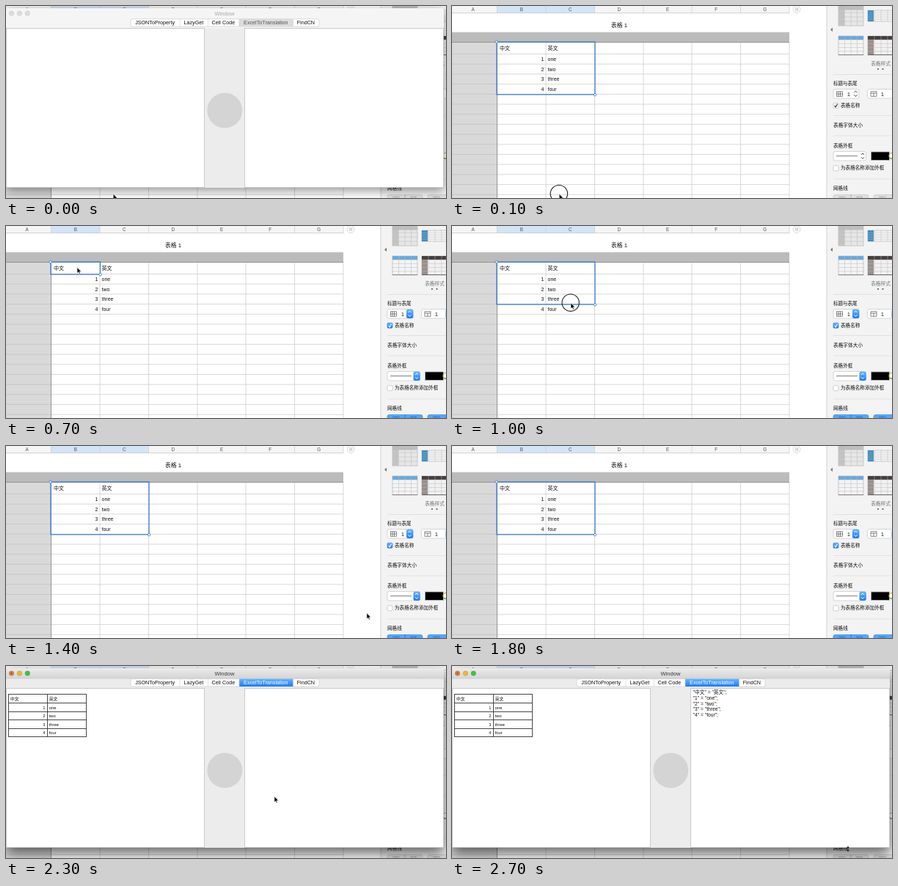
Animation, 600 px wide and 262 px high, one loop 2800 ms. Source, as an HTML page:

```html
<!DOCTYPE html>
<html lang="zh">
<head>
<meta charset="utf-8">
<style>
html, body { margin: 0; width: 100%; height: 100%; overflow: hidden; background: #fff; }
svg { display: block; width: 600px; height: 262px; }
text { font-family: "Liberation Sans", "Noto Sans CJK SC", "Noto Sans CJK", sans-serif; white-space: pre; }
#win { filter: drop-shadow(0 4px 7px rgba(0,0,0,.42)); }
#win.live { filter: drop-shadow(0 8px 9px rgba(0,0,0,.6)); }
</style>
</head>
<body>
<svg id="stage" viewBox="0 0 600 262" xmlns="http://www.w3.org/2000/svg">
  <defs>
    <linearGradient id="blue" x2="0" y2="1"><stop stop-color="#6db5fb"/><stop offset="1" stop-color="#1a7bf8"/></linearGradient>
    <linearGradient id="bar" x2="0" y2="1"><stop stop-color="#ebebeb"/><stop offset="1" stop-color="#d4d4d4"/></linearGradient>
  </defs>
  <g id="sheet"></g>
  <g id="win"></g>
  <g id="pointer"></g>
</svg>
<script>
const LOOP = 2800, STEP = 100;
const $ = id => document.getElementById(id);
const rect = (x, y, w, h, fill, more = '') => `<rect x="${x}" y="${y}" width="${w}" height="${h}" fill="${fill}" ${more}/>`;
const dot = (x, y, r, fill, more = '') => `<circle cx="${x}" cy="${y}" r="${r}" fill="${fill}" ${more}/>`;
const path = (d, stroke, w = 1, fill = 'none') => `<path d="${d}" stroke="${stroke}" stroke-width="${w}" fill="${fill}"/>`;
// y is the middle of the line of text
const text = (s, x, y, size = 7, fill = '#111', anchor = 'start', more = '') =>
  `<text x="${x}" y="${y + size * .36}" font-size="${size}" fill="${fill}" text-anchor="${anchor}" ${more}>${s}</text>`;

const cols = [0, 61.5, 128, 194.5, 261, 327, 393.5, 460];
const rows = Array.from({ length: 16 }, (_, i) => i ? 65.5 + (i - 1) * 13.7 : 49.5);
const words = [['中文', '英文'], ['1', 'one'], ['2', 'two'], ['3', 'three'], ['4', 'four']];

function cells(xLeft, xNum, xWord, y, size) {
  return words.map(([a, b], i) =>
    text(a, i ? xNum : xLeft, y(i), size, '#111', i ? 'end' : 'start') +
    text(b, xWord, y(i), size)).join('');
}

function thumb(x, y, w, h, top, side, body) {
  let s = rect(x, y, w, h, body, 'stroke="#aaa" stroke-width=".6"');
  if (side) s += rect(x, y, 8, h, side);
  if (top) s += rect(x, y, w, 5, top);
  for (let i = 1; i < 5; i++) s += path(`M${x} ${y + i * h / 5}h${w}`, '#b9b9b9', .5);
  for (let i = 1; i < 4; i++) s += path(`M${x + i * w / 4} ${y}v${h}`, '#b9b9b9', .5);
  return s;
}

function arrows(x, y, color) {
  return path(`M${x - 2} ${y - 1.6}l2 -2.2l2 2.2M${x - 2} ${y + 1.6}l2 2.2l2 -2.2`, color, 1);
}

function popup(x, y, w, live) {
  const r = 'rx="2.5"';
  return rect(x, y, w, 12.5, '#fff', r + ' stroke="#c6c6c6" stroke-width=".7"') +
    (live ? rect(x + w - 9, y, 9.3, 12.5, 'url(#blue)', r) : '') +
    arrows(x + w - 4.5, y + 6.2, live ? '#fff' : '#444');
}

function check(y, label, on, live) {
  const fill = on && live ? 'url(#blue)' : '#fff';
  return rect(520, y, 7, 7, fill, `rx="1.2" stroke="${on && live ? '#2f83ee' : '#bbb'}" stroke-width=".7"`) +
    (on ? path(`M521.6 ${y + 3.6}l1.6 2l2.4 -4.4`, live ? '#fff' : '#333', 1.1) : '') +
    text(label, 530, y + 3.3, 6.6);
}

function tableIcon(x, y, d) {
  return rect(x, y, 8, 6.4, '#fff', 'stroke="#555" stroke-width=".7"') + path(d, '#555', .7);
}

function sidebar(live) {
  const head = (s, y, size = 6.6) => text(s, 520, y, size, '#111', 'start', 'font-weight="500"');
  let s = rect(511, 0, 89, 262, '#f3f3f3') + path('M511 0V262', '#cfcfcf', 1);
  s += thumb(527, -3, 34, 30, '', '#c4c4c4', '#e6e6e6') + rect(527, -3, 34, 8.5, '#bcbcbc', 'opacity=".9"');
  s += thumb(567, 6, 36, 15, '', '#3f8cc0', '#f4f4f4');
  s += thumb(527, 41, 34, 26, '#6ba9db', '', '#f4f4f4') + path('M527 66.5h34', '#777', .8);
  s += thumb(567, 41, 36, 26, '#463f40', '#9b8f8b', '#f1f1f1') + path('M567 66.5h36', '#555', .8);
  s += path('M519 29.5l-3 2.7l3 2.7z', 'none', 0, '#777');
  s += text('表格样式', 584.5, 79, 6.7, '#777', 'middle') + dot(581, 86, 1.1, '#555') + dot(587.5, 86, 1.1, '#555');
  for (const y of [93.5, 149.5, 177, 236]) s += path(`M520 ${y}H600`, '#dedede', .8);
  s += head('标题与表尾', 105.5, 6.5);
  s += popup(520, 113.5, 35, live) + popup(566.5, 113.5, 42, live);
  s += tableIcon(524.5, 116.8, 'M527 116.8v6.4M529.5 116.8v6.4M524.5 120h8') + text('1', 539, 120);
  s += tableIcon(571, 116.8, 'M571 119h8M575 119v4.2') + text('1', 585, 120);
  s += check(132.3, '表格名称', true, live);
  s += head('表格字体大小', 163, 6.7);
  s += head('表格外框', 190.3);
  s += popup(520, 198.5, 44.5, live) + path('M524 204.7H553', '#555', .8);
  s += rect(571.5, 199, 25, 11.5, '#000', 'stroke="#bbb" stroke-width=".8"');
  s += dot(600, 204.5, 4, '#fff', 'stroke="#c7a13c" stroke-width="1.2"') + path('M597.4 207a4 4 0 0 0 2.6 1.5', '#4fae4f', 1.3);
  s += check(217.8, '为表格名称添加外框', false, live);
  s += head('网格线', 249);
  const [btn, edge, mark] = live ? ['#58a4f6', '#3d8eea', '#2f6fb8'] : ['#e0e0e0', '#c4c4c4', '#a5a5a5'];
  for (const [x, w] of [[520, 48], [575, 30]])
    s += rect(x, 257.5, w, 12, btn, `rx="2.5" stroke="${edge}" stroke-width=".7"`);
  s += path('M527 260.5h10M532 260v2M551 260.5h9M553.5 260v2M558 260v2M582 260.5h10M586 260v2M544 257.5v5', mark, .8);
  return s;
}

function selection(c, bottom) {
  const x = cols[c], blue = '#3f7fd0';
  const knob = (kx, ky) => dot(kx, ky, 1.7, '#fff', `stroke="${blue}" stroke-width=".9"`);
  return rect(61, 49, x - 60.5, bottom - 49, 'none', `stroke="${blue}" stroke-width="1.3"`) +
    knob(60.6, 49) + knob(x + .6, bottom + .3);
}

function sheet(live, c, bottom) {
  let s = rect(0, 0, 600, 262, '#fff') + rect(0, 0, 460, 9.5, '#f5f5f5');
  s += rect(61.5, 0, cols[c] - 61.5, 9.5, '#d3e4f7');
  s += rect(0, 36, 460, 13.5, '#bbb') + rect(0, 49.5, 61.5, 213, '#d9d9d9');
  s += path('M0 9.5H460M0 36H460', '#c8c8c8', .8);
  cols.slice(1).forEach(x => {
    s += path(`M${x} 0V9.5`, '#d0d0d0', .8) + path(`M${x} 49.5V262`, '#cfcfcf', .8);
  });
  rows.slice(1).forEach(y => {
    s += path(`M0 ${y}H61.5`, '#c2c2c2', .8) + path(`M61.5 ${y}H460`, '#cfcfcf', .8);
  });
  s += path('M0 49.5H460M61.5 49.5V262', '#8d8d8d', .9);
  [...'ABCDEFG'].forEach((l, i) => {
    s += text(l, i ? (cols[i] + cols[i + 1]) / 2 : 28.5, 5, 6.3, '#555', 'middle');
  });
  s += dot(470, 4.5, 5, '#fafafa', 'stroke="#d2d2d2" stroke-width=".8"') + path('M469 2.3v4.4M471.2 2.3v4.4', '#999', .7);
  s += text('表格 1', 228, 25.7, 7.8, '#111', 'middle');
  s += cells(65, 125.5, 130.5, i => i ? 58.6 + i * 13.7 : 57.3, 7);
  return s + selection(c, bottom) + sidebar(live);
}

const tabs = [['JSONToProperty', 170, 237], ['LazyGet', 237, 275.5], ['Cell Code', 275.5, 318],
  ['ExcelToTranslation', 318, 391.5], ['FindCN', 391.5, 427]];

function pasted() {
  const ys = [38.5, 50.5, 62.5, 73.5, 85.5, 96.5];
  return path('M3.5 38.5V96.5M56.5 38.5V96.5M109.5 38.5V96.5' + ys.map(y => `M3 ${y}H110`).join(''), '#333', .9) +
    cells(6, 53.5, 58.7, i => 45 + i * 11.5, 5.8);
}

function panel(live, table, output, caret) {
  let s = path('M0 248V6q0 -3 3 -3H594q3 0 3 3V248z', 'none', 0, live ? '#ececec' : '#f5f5f5');
  if (live) s += path('M0 17V6q0 -3 3 -3H594q3 0 3 3V17z', 'none', 0, 'url(#bar)');
  if (live) s += path('M0 17.2H597', '#cbcbcb', .6);
  const lights = live ? ['#d9803a', '#f0b72f', '#3bc645'] : ['#dcdcdc', '#dcdcdc', '#dcdcdc'];
  lights.forEach((f, i) => {
    s += dot(7.5 + i * 10.9, 10, 3.3, f, `stroke="${live ? '#0003' : '#cecece'}" stroke-width=".6"`);
  });
  if (live) s += dot(7.5, 10, 1, '#8c4a1c');
  s += text('Window', 298, 10, 7.6, live ? '#3c3c3c' : '#a8a8a8', 'middle');
  s += rect(0, 30.5, 597, 217.5, '#ececec');
  s += rect(170, 17.7, 257, 10.3, '#fff', 'rx="2.5" stroke="#cdcdcd" stroke-width=".7"');
  tabs.forEach(([name, a, b], i) => {
    const on = i === 3;
    if (on) s += rect(a, 17.5, b - a, 10.5, live ? 'url(#blue)' : '#dcdcdc');
    if (i) s += path(`M${a} 18v9.8`, '#cfcfcf', .6);
    s += text(name, (a + b) / 2 - .4, 22.7, 7.2, on ? (live ? '#fff' : '#555') : '#111', 'middle');
  });
  for (const [x, w] of [[.5, 270], [325.5, 271]])
    s += rect(x, 30.5, w, 217, '#fff', 'stroke="#c4c4c4" stroke-width=".9"');
  s += dot(298.3, 142.5, 24, '#d4d4d4');
  if (caret) s += path('M3.5 31V39', '#222', .9);
  if (table) s += pasted();
  if (output) words.forEach(([a, b], i) => { s += text(`"${a}" = "${b}";`, 328.7, 35.8 + i * 7.65, 6.7); });
  return s;
}

// time, x, y
const track = [[0, 146.2, 256.5], [200, 146.2, 256.5], [600, 97, 56.5], [800, 97, 56.5], [1000, 162, 105],
  [1100, 166, 114], [1200, 166, 114], [1500, 606, 268], [2100, 560, 272], [2400, 298, 145], [2500, 298, 145], [2700, 540, 249.7]];

function place(t) {
  const i = track.findIndex(k => k[0] > t);
  if (i < 0) return track[track.length - 1].slice(1);
  const [t0, x0, y0] = track[i - 1], [t1, x1, y1] = track[i];
  let p = (t - t0) / (t1 - t0);
  p = p * p * (3 - 2 * p);
  return [x0 + (x1 - x0) * p, y0 + (y1 - y0) * p];
}

const within = (t, a, b) => t >= a && t < b;

function pointer(t) {
  const [x, y] = place(t);
  if (t >= 2700)
    return path(`M${x} ${y - 2.5}v5M${x - 1.2} ${y - 1.8}l1.2 -1.6l1.2 1.6zM${x - 1.2} ${y + 1.8}l1.2 1.6l1.2 -1.6z`, '#222', .8, '#222');
  const down = within(t, 100, 200) || within(t, 600, 700) || within(t, 800, 1200) || within(t, 2400, 2500);
  return (down ? dot(x - .3, y - .3, 11.7, 'none', 'stroke="#222" stroke-width="1.1"') : '') +
    path(`M${x} ${y}v8l1.9 -1.7l1.2 2.8l1.3 -.6l-1.2 -2.7h2.5z`, '#fff', .6, '#000');
}

let last = -1;
function draw(now) {
  const t = Math.floor(now % LOOP / STEP) * STEP;
  if (t === last) return;
  last = t;
  const single = within(t, 600, 900);
  const bottom = single ? 66 : t === 900 ? 93 : t === 1000 ? 107 : 120.8;
  const live = t >= 1900;
  $('sheet').innerHTML = sheet(within(t, 200, 2000), single ? 2 : 3, bottom);
  $('win').setAttribute('class', live ? 'live' : '');
  $('win').innerHTML = live || t < 100 ? panel(live, t >= 2200, t >= 2500, within(t, 1900, 2200)) : '';
  $('pointer').innerHTML = pointer(t);
}

const start = performance.now();
function tick() {
  draw(performance.now() - start);
  requestAnimationFrame(tick);
}
tick();
</script>
</body>
</html>
```
